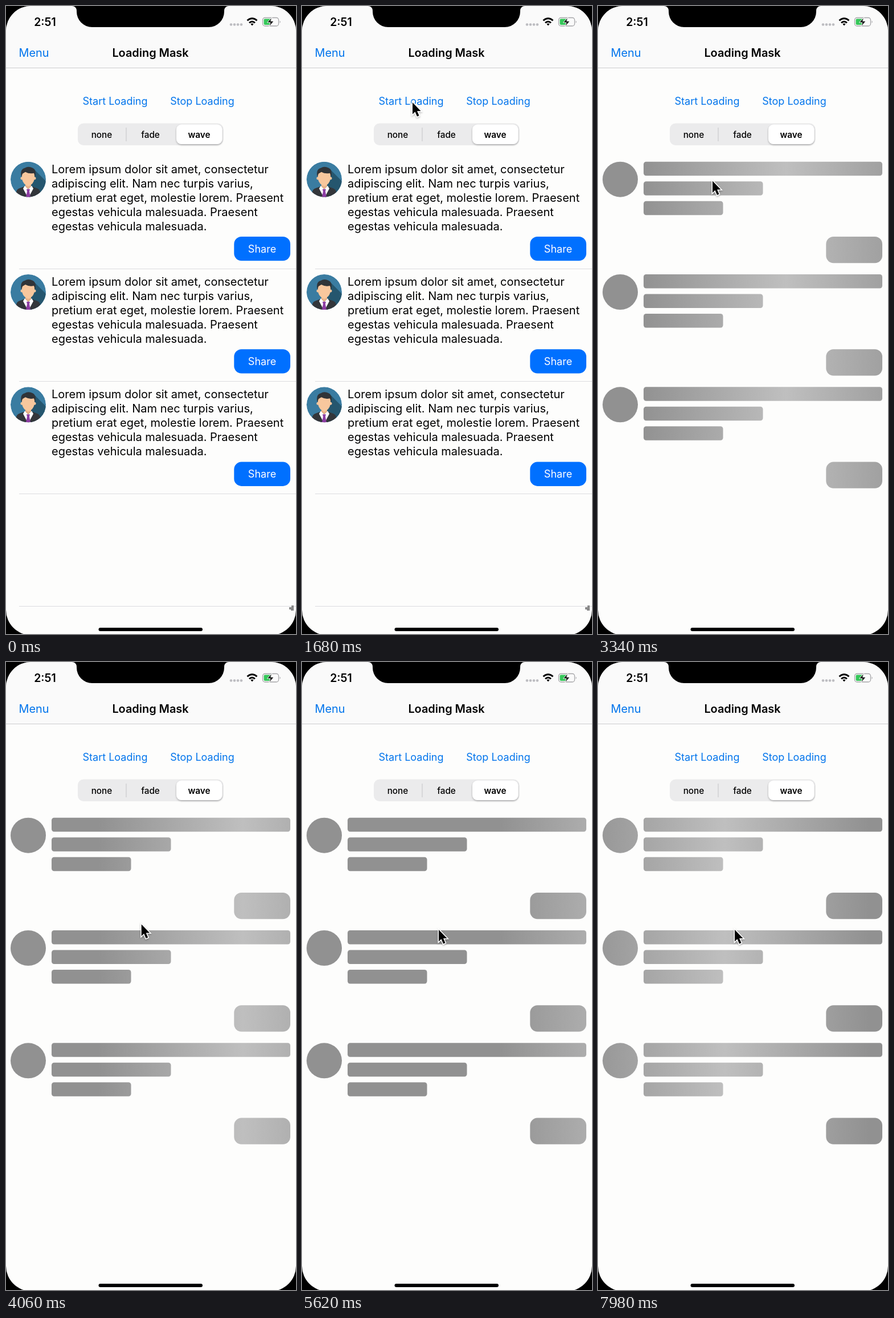
Animation of 509x1100 px, one loop 8 s. Source, as an HTML page:

```html
<!DOCTYPE html>
<html lang="en">
<head>
<meta charset="utf-8">
<title>Loading mask</title>
<style>
  html, body { margin: 0; width: 100%; height: 100%; overflow: hidden; background: #000; }
  svg { display: block; width: 509px; height: 1100px; font-family: Inter, "Liberation Sans", sans-serif; }
  .mid { text-anchor: middle; }
  .blue { fill: #0074ec; }
  .nav { font-size: 19.9px; }
  .action { font-size: 18px; }
  .tab { font-size: 15.3px; font-weight: 500; }
  .bold { font-weight: 600; }
  .body { font-size: 20px; }
</style>
</head>
<body>
<svg viewBox="0 0 509 1100">
  <defs>
    <linearGradient id="shine" gradientUnits="userSpaceOnUse" x1="-254" x2="254">
      <stop offset="0" stop-color="#919191"/>
      <stop offset=".5" stop-color="#bfbfbf"/>
      <stop offset="1" stop-color="#919191"/>
    </linearGradient>
    <clipPath id="screen"><rect width="509" height="1102" rx="44"/></clipPath>
    <clipPath id="disc"><circle r="31"/></clipPath>
    <filter id="soft" x="-30%" y="-30%" width="160%" height="160%">
      <feDropShadow dx="0" dy="1.5" stdDeviation="1.5" flood-opacity=".3"/>
    </filter>
    <g id="avatar" clip-path="url(#disc)">
      <circle r="31" fill="#3a7ca1"/>
      <path d="M9-19 40 12V40H0V0z" fill="#25566e"/>
      <path d="M-21 33V23q0-6 7-8L-6 12H6l8 3q7 2 7 8V33z" fill="#33363a"/>
      <path d="M-6 11 0 17 6 11 9 16 0 33-9 16z" fill="#fff"/>
      <path d="M-5 6H5V12L0 17-5 12z" fill="#eab388"/>
      <path d="M-3 17H3L2 21 4 31H-4L-2 21z" fill="#8d3da3"/>
      <path d="M-11-14H11V-1Q9 9 0 12-9 9-11-1z" fill="#f8c79d"/>
      <circle cx="-11" cy="-2" r="2.500" fill="#f8c79d"/>
      <circle cx="11" cy="-2" r="2.500" fill="#f8c79d"/>
      <path d="M-12-4Q-15-18-6-20 0-24 8-20 15-17 12-4L10-11Q2-9-5-13L-10-10z" fill="#303438"/>
    </g>
  </defs>

  <g clip-path="url(#screen)">
    <rect width="509" height="1100" fill="#fdfdfc"/>
    <rect width="509" height="108" fill="#fafafa"/>
    <path d="M0 108.500H509" stroke="#cbcbce"/>
    <path d="M116 0A8 8 0 0 1 124 8V10A27 27 0 0 0 151 37H356A27 27 0 0 0 383 10V8A8 8 0 0 1 391 0z"/>

    <text class="mid bold" x="68.500" y="35" font-size="19.500">2:51</text>
    <g fill="#bdbdc1">
      <circle cx="395" cy="32.500" r="2.300"/><circle cx="401" cy="32.500" r="2.300"/>
      <circle cx="407" cy="32.500" r="2.300"/><circle cx="413" cy="32.500" r="2.300"/>
    </g>
    <g fill="none" stroke="#000" stroke-width="3">
      <path d="M423.500 25.500Q432 18 440.500 25.500M427 29.500Q432 25 437 29.500"/>
      <path d="M429.500 31.500Q432 29.500 434.500 31.500L432 34.500z" fill="#000" stroke="none"/>
    </g>
    <rect x="450.500" y="20.500" width="28" height="14.500" rx="4" fill="none" stroke="#a5a5a8" stroke-width="1.300"/>
    <path d="M480.500 25.500q2.500 2.300 0 4.600z" fill="#a5a5a8"/>
    <rect x="452.500" y="22.500" width="13" height="10.500" rx="2" fill="#35c759"/>
    <path d="M467 19.500 458.500 29H464L461.500 36.500 470 26.500H464.500z" stroke="#fafafa" stroke-width="1"/>

    <text class="mid nav blue" x="49" y="89">Menu</text>
    <text class="mid nav bold" x="253.500" y="89">Loading Mask</text>
    <text id="start" class="mid action blue" x="191.500" y="173">Start Loading</text>
    <text class="mid action blue" x="344.500" y="173">Stop Loading</text>

    <rect x="126" y="205.500" width="255.500" height="38.500" rx="10" fill="#ebebec"/>
    <path d="M211 213V237" stroke="#cfcfd2" stroke-width="1.400"/>
    <rect x="299" y="207.500" width="80.500" height="34.500" rx="9" fill="#fff" filter="url(#soft)"/>
    <text class="mid tab" x="168" y="230.500">none</text>
    <text class="mid tab" x="253.500" y="230.500">fade</text>
    <text class="mid tab bold" x="339" y="230.500">wave</text>

    <g id="list"></g>
    <g id="mask" fill="url(#shine)"></g>
    <rect x="162.500" y="1089" width="182.500" height="6" rx="3"/>
  </g>

  <g id="cursor">
    <path d="M1 2.500V23L5.500 18.800 9 27 12.500 25.500 9 17.500H15.500z"
          stroke="#fff" stroke-width="3" paint-order="stroke" filter="url(#soft)"/>
  </g>
</svg>
<script>
const $ = id => document.getElementById(id);
const rowPitch = 197.3;
const lines = [
  "Lorem ipsum dolor sit amet, consectetur",
  "adipiscing elit. Nam nec turpis varius,",
  "pretium erat eget, molestie lorem. Praesent",
  "egestas vehicula malesuada. Praesent",
  "egestas vehicula malesuada."
];
const box = (x, y, w, h, r, extra = "") =>
  `<rect x="${x}" y="${y}" width="${w}" height="${h}" rx="${r}" ${extra}/>`;
const rule = y => `<path d="M23 ${y}H509" stroke="#dcdce0"/>`;

let list = "", mask = "";
for (let i = 0; i < 3; i++) {
  const y = 272.7 + i * rowPitch;
  list += `<use href="#avatar" x="39" y="${y + 31}"/>`
    + lines.map((s, n) => `<text class="body" x="80" y="${y + 20 + n * 25}">${s}</text>`).join("")
    + box(400.3, y + 131.3, 98.7, 42.3, 13, 'fill="#0070ff"')
    + `<text class="mid action" x="449.5" y="${y + 159}" fill="#fff">Share</text>`
    + rule(Math.round(y + 187) + .5);
  mask += `<circle cx="39" cy="${y + 31}" r="31"/>`
    + box(80, y, 419, 24.5, 4.5) + box(80, y + 34.5, 209.5, 24.5, 4.5)
    + box(80, y + 69, 139.5, 24.5, 4.5) + box(400.3, y + 131.3, 98.7, 46.2, 13);
}
list += rule(1051.5) + '<path d="M497 1053H501V1050H505V1059H500V1057H497z" fill="#8a8a8a"/>';
$("list").innerHTML = list;
$("mask").innerHTML = mask;

// Pointer stops: step, x, y
const stops = [
  [1, 500, 1052], [10, 345, 560], [19, 261, 324], [36, 193, 166.5],
  [57, 193, 166.5], [71, 200, 304], [88, 239, 466.5]
];
const press = 38, release = 46, wavePeriod = 120;

function pointerAt(step) {
  const next = stops.findIndex(s => s[0] > step);
  if (next < 0) return stops.at(-1).slice(1);
  const [a, x, y] = stops[Math.max(0, next - 1)], [b, u, v] = stops[next];
  const p = (step - a) / (b - a);
  return [x + (u - x) * p, y + (v - y) * p];
}

// Steps last 20, 100 and 20 ms in turn
function stepAt(ms) {
  const rest = ms % 140;
  return Math.floor(ms / 140) * 3 + (rest < 20 ? 0 : rest < 120 ? 1 : 2);
}

function draw(now) {
  const step = stepAt(now % 8000), loading = step >= release;
  $("list").style.display = loading ? "none" : "";
  $("mask").style.display = loading ? "" : "none";
  if (loading) {
    const peak = 195 + (step - release) % wavePeriod * 5.4;
    $("shine").setAttribute("gradientTransform", `translate(${peak})`);
  }
  const back = Math.min(1, Math.max(0, (step - release - 2) / 24));
  $("start").setAttribute("opacity", step < press ? 1 : .22 + .78 * back * back * (3 - 2 * back));
  const [x, y] = pointerAt(step);
  $("cursor").style.display = step ? "" : "none";
  $("cursor").setAttribute("transform", `translate(${x} ${y})`);
  requestAnimationFrame(draw);
}
requestAnimationFrame(draw);
</script>
</body>
</html>
```
